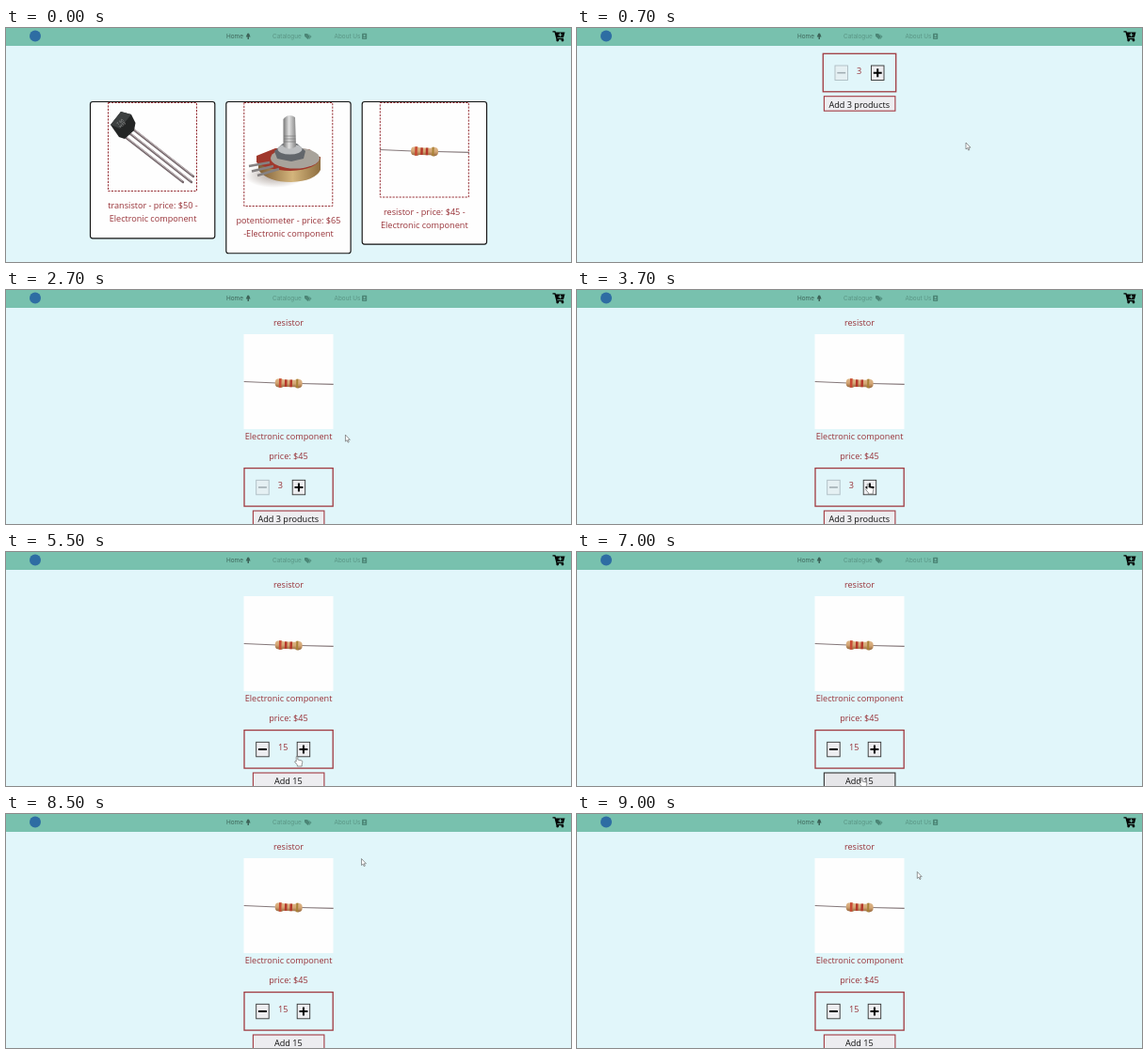
Recreate the animation shown at these times as an HTML page. Size 600 px wide and 249 px high, loop 9300 ms.

```html
<!DOCTYPE html>
<html lang="en">
<head>
<meta charset="utf-8">
<title>Component shop</title>
<style>
  html, body { margin: 0; height: 100%; overflow: hidden; background: #e1f6fa; }
  svg { display: block; width: 100vw; height: 100vh; }
  text { font: 9.15px "Open Sans", "Noto Sans", sans-serif; fill: #983238; text-anchor: middle; }
  .nav text { font: 6.4px Inter, sans-serif; fill: #5a9585; text-anchor: start; }
  .nav .on { fill: #3d6358; }
  .card { fill: #fefefe; stroke: #111; stroke-width: 1.15; }
  .dash { fill: #fefefe; stroke: #962f35; stroke-dasharray: 2.2 1.3; }
  .frame { fill: none; stroke: #a03a40; stroke-width: 1.3; }
  .btn { fill: #ededf0; stroke: #333; stroke-width: .9; }
  .off .btn { fill: #e5f0f3; stroke: #adbcc2; }
  .sign { stroke: #000; stroke-width: 2; }
  .off .sign { stroke: #a2aeb4; stroke-width: 1.6; }
  #add { stroke: #a23a42; stroke-width: 1.1; }
  #add.hover { fill: #e6e6e9; stroke: #333; }
  #label { fill: #111; }
  #alert { filter: drop-shadow(0 1px 1px #0005); }
  #alert text { font-size: 6.75px; fill: #333; text-anchor: start; }
  #alert .small { font-size: 5.85px; fill: #666; }
  #alert .ok { font-size: 5.5px; font-weight: 600; fill: #fff; text-anchor: middle; }
  .cursor { fill: #fff; stroke: #555; stroke-width: .6; stroke-linejoin: round; }
</style>
</head>
<body>
<svg viewBox="0 0 600 249" preserveAspectRatio="none">
  <defs>
    <linearGradient id="metal">
      <stop offset="0" stop-color="#777"/><stop offset=".45" stop-color="#e2e2e2"/><stop offset="1" stop-color="#858585"/>
    </linearGradient>
    <linearGradient id="brass">
      <stop offset="0" stop-color="#7d5c34"/><stop offset=".55" stop-color="#d4b57c"/><stop offset="1" stop-color="#8d6d3f"/>
    </linearGradient>
    <linearGradient id="clay" x2="0" y2="1">
      <stop offset="0" stop-color="#dfb98c"/><stop offset=".5" stop-color="#d3a574"/><stop offset="1" stop-color="#94663c"/>
    </linearGradient>
    <radialGradient id="shade">
      <stop offset="0" stop-color="#8a7a70" stop-opacity=".7"/><stop offset="1" stop-color="#8a7a70" stop-opacity="0"/>
    </radialGradient>
    <g id="resistor" fill="none">
      <path d="M0 50L35 51.5M60 52L95 52.8" stroke="#85787a" stroke-width="1.2"/>
      <g transform="rotate(1.8 47.5 51.8)">
        <path d="M36 47.4Q33 47.4 33 51.8T36 56.2Q39 57.2 42 55.6H54Q57 57.2 59.5 56.2Q62 55.6 62 51.8T59.5 47.4Q57 46.4 54 48H42Q39 46.4 36 47.4Z" fill="url(#clay)"/>
        <path d="M38.5 47V56.6" stroke="#c94a34" stroke-width="2.6"/>
        <path d="M44.5 48V55.6M50 48V55.6" stroke="#b5382b" stroke-width="2.5"/>
        <path d="M56.5 47V56.5" stroke="#a98337" stroke-width="2"/>
      </g>
    </g>
  </defs>

  <g id="catalogue">
    <rect class="card" x="89.5" y="78.5" width="132.3" height="145.3" rx="2.5"/>
    <rect class="card" x="233.8" y="78.5" width="132.3" height="161.2" rx="2.5"/>
    <rect class="card" x="378.2" y="78.5" width="132.3" height="151.6" rx="2.5"/>
    <rect class="dash" x="108.5" y="79.5" width="94" height="94"/>
    <rect class="dash" x="252.8" y="79.5" width="94" height="110"/>
    <rect class="dash" x="397.3" y="79.5" width="94" height="100.5"/>

    <g fill="none" stroke-linecap="round">
      <path d="M134 107L199 158M130 111L197 164M124 114L188 164" stroke="#75686c" stroke-width="2.3"/>
      <path d="M136 107.8L198 156.5M132 111.8L196 162.5M126 114.8L187 162.5" stroke="#d8cfd1" stroke-width=".8"/>
    </g>
    <path d="M111 103L122 89L133 92L137.500 101L136 109L126 118L120 116Z" fill="#232525"/>
    <path d="M111 103L122 89L133 92L121 107Z" fill="#3d4040"/>
    <g transform="translate(122 101) rotate(-40)">
      <text style="font-size:4px;fill:#aaa">T 60</text>
      <text y="4" style="font-size:4px;fill:#aaa">H33</text>
    </g>

    <ellipse cx="285" cy="157" rx="32" ry="13" fill="url(#shade)"/>
    <path d="M268 138V151Q278 164 303 164Q328 163 334 151V137Z" fill="url(#brass)"/>
    <path d="M266 136L286 128L322 129L334 138Q330 151 302 152Q276 151 266 143Z" fill="#a0382c"/>
    <ellipse cx="307" cy="138.500" rx="26" ry="11" fill="#a8a39b"/>
    <path d="M285 131L294 123H309L318 131L316 139L303 142L288 139Z" fill="#62666b"/>
    <ellipse cx="301.500" cy="129" rx="13" ry="5.500" fill="#bcbec0"/>
    <path d="M280 143L258 147M284 147L261 152.500M290 150L267 157" stroke="#858181" stroke-width="2.600"/>
    <path d="M294.500 97Q300 90 307 95L308 126Q301 131 294.500 126Z" fill="url(#metal)"/>
    <path d="M295 115H307.500M295 118H307.500M295 121H307.500" stroke="#777" stroke-width=".7"/>

    <use href="#resistor" x="397" y="79.5"/>
    <text x="156" y="192">transistor - price: $50 -</text>
    <text x="156" y="206">Electronic component</text>
    <text x="300" y="208.2">potentiometer - price: $65</text>
    <text x="300" y="222.2">-Electronic component</text>
    <text x="444.3" y="198.5">resistor - price: $45 -</text>
    <text x="444.3" y="212.5">Electronic component</text>
  </g>

  <g id="product">
    <text x="300" y="37.5">resistor</text>
    <rect x="252.5" y="47" width="95" height="101" fill="#fefefe"/>
    <use href="#resistor" x="252.7" y="47.5"/>
    <text x="300" y="159.3">Electronic component</text>
    <text x="300" y="179.5">price: $45</text>
  </g>

  <g id="buy">
    <rect id="frame" class="frame" y="27.3" height="40.5"/>
    <g id="row">
      <g id="minus">
        <rect class="btn" x=".5" y="40" width="13.5" height="15.5"/>
        <path class="sign" d="M2.800 47.7H11.7"/>
      </g>
      <text id="count" y="49"></text>
      <g id="plus">
        <rect class="btn" x=".5" y="40" width="13.5" height="15.5"/>
        <path class="sign" d="M2.8 47.7H11.7M7.25 43.2V52.2"/>
      </g>
    </g>
    <rect id="add" class="btn" x="262.4" y="72.7" width="75.5" height="15.5"/>
    <text id="label" x="299.8" y="84.5"></text>
  </g>

  <g class="nav">
    <rect width="600" height="19" fill="#78c1ae"/>
    <circle cx="31" cy="8.5" r="6" fill="#2e6da3"/>
    <text class="on" x="234" y="11.3">Home</text>
    <text x="283" y="11.3">Catalogue</text>
    <text x="348.5" y="11.3">About Us</text>
    <path class="on" d="M256.2 6Q257.2 5 258.2 6L259.6 9.5H258V12H256.5V9.5H254.8Z"/>
    <path d="M317 6H320L323 9L320.5 12L317 8.7ZM321 6L324.5 9L322 12L321.5 11.5L323.5 9Z" fill="#4c8676"/>
    <rect x="378" y="5.8" width="5.2" height="6.2" rx=".7" fill="#4c8676"/>
    <circle cx="380.6" cy="8" r="1" fill="#78c1ae"/>
    <path d="M379 10.7Q380.6 8.7 382.2 10.7Z" fill="#78c1ae"/>
    <path d="M580.5 3.8H583L585 11.5H592" fill="none" stroke="#000" stroke-width="1.3"/>
    <path d="M583.3 4.5H593.5L592 10H584.7Z"/>
    <path d="M588.5 5.3V9.2M586.5 7.2H590.5" stroke="#78c1ae" stroke-width="1"/>
    <circle cx="585.7" cy="13" r="1.4"/><circle cx="591" cy="13" r="1.4"/>
  </g>

  <g id="alert">
    <path d="M197.5 0H410V56.5Q410 58 408.5 58H199Q197.5 58 197.5 56.5Z" fill="#fff"/>
    <text x="205" y="12">localhost:3002 dice</text>
    <text class="small" x="205" y="25">products added</text>
    <rect x="367" y="35.5" width="35.5" height="15" rx="1.5" fill="#3a80e0"/>
    <text class="ok" x="384.7" y="45.2">Aceptar</text>
  </g>

  <g id="pointer" class="cursor">
    <path id="arrow" d="M0 0V7L1.6 5.6L2.7 8.1L3.8 7.6L2.7 5.2H4.9Z"/>
    <path id="hand" d="M-.8 6V.8Q0 -.4 .8 .8V4L5 5Q6 5.3 5.8 6.5L5.2 9V11H.3V9.5L-2.5 6.3Q-2.3 5 -.8 6Z"/>
  </g>
</svg>
<script>
const LOOP = 9300, STEP = 100;
// Pointer tip: time, x, y
const path = [
  [100, 440, 215], [500, 413, 122], [900, 413, 122], [1500, 397, 116], [2000, 397, 116],
  [2900, 350, 165], [3500, 309, 206], [5400, 309, 206], [5500, 309, 217], [6000, 302, 240],
  [7100, 302, 240], [7500, 330, 164], [8100, 384, 42], [8300, 384, 42], [9000, 361.3, 61.5]
];
// Time, amount in the counter
const counts = [[0, 3], [4200, 4], [4300, 5], [4500, 7], [4700, 8], [4800, 9], [5000, 11], [5100, 15]];

const $ = id => document.getElementById(id);
const show = (id, on) => $(id).style.display = on ? '' : 'none';
const move = (id, x, y = 0) => $(id).setAttribute('transform', `translate(${x} ${y})`);

function pointerAt(t) {
  const i = path.findIndex(p => p[0] > t);
  if (i < 0) return path[path.length - 1].slice(1);
  const [t0, x0, y0] = path[Math.max(i - 1, 0)], [t1, x1, y1] = path[i];
  const k = Math.max(0, (t - t0) / (t1 - t0 || 1));
  return [x0 + (x1 - x0) * k, y0 + (y1 - y0) * k];
}

function draw(t) {
  const loaded = t >= 2700, shopping = t >= 700;
  show('catalogue', !shopping);
  show('product', loaded);
  show('buy', shopping);
  show('alert', t >= 7200 && t < 8500);

  const n = counts.filter(c => c[0] <= t).pop()[1], wide = n > 9;
  const left = loaded ? 253 : 261.3;
  move('buy', 0, loaded ? 162.3 : 0);
  $('frame').setAttribute('x', left);
  $('frame').setAttribute('width', loaded ? 94.2 : 77.4);
  move('row', left + 12.2);
  $('minus').setAttribute('class', n > 3 ? '' : 'off');
  $('count').textContent = n;
  $('count').setAttribute('x', wide ? 29 : 26.2);
  move('plus', wide ? 43.5 : 38.5);
  $('label').textContent = 'Add ' + n + (wide ? '' : ' products');
  $('add').setAttribute('class', t >= 5900 && t < 8500 ? 'btn hover' : 'btn');

  const hand = t >= 400 && t < 700 || t >= 3700 && t < 8000;
  show('pointer', t >= 100);
  show('hand', hand);
  show('arrow', !hand);
  move('pointer', ...pointerAt(t));
}

const start = performance.now();
function tick() {
  const t = (performance.now() - start) % LOOP;
  draw(Math.floor(t / STEP) * STEP);
  requestAnimationFrame(tick);
}
tick();
</script>
</body>
</html>
```
